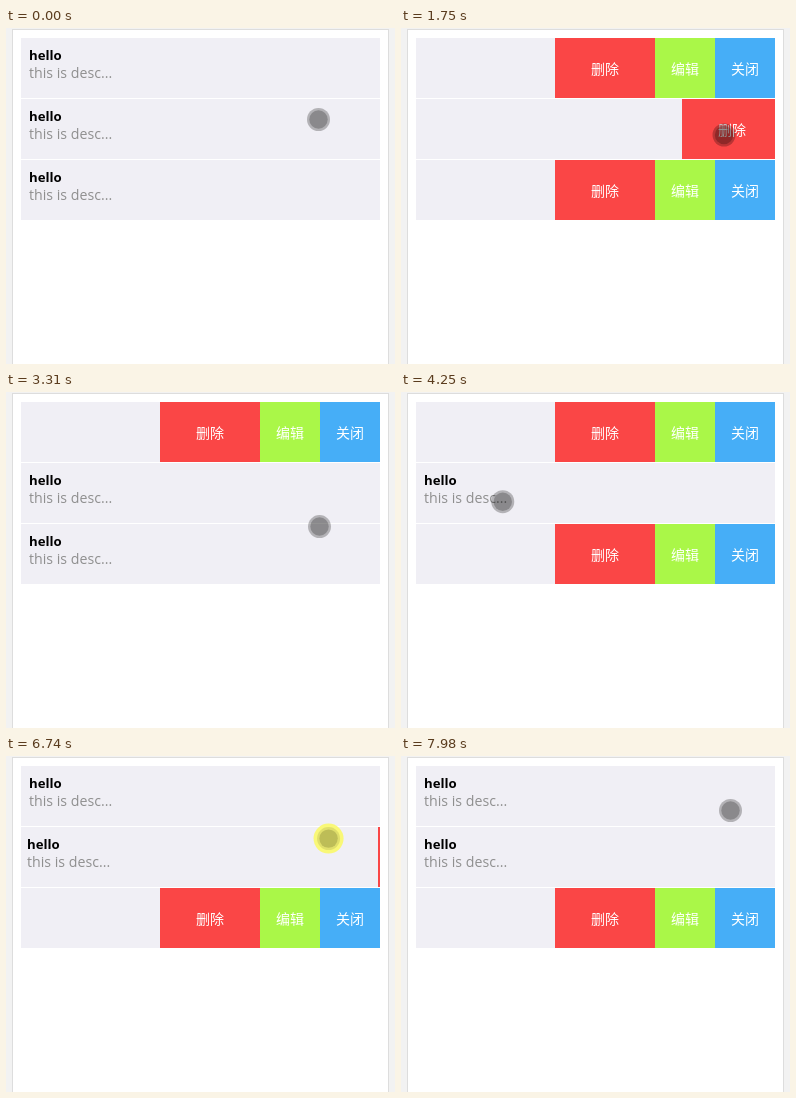
An HTML page with a canvas that plays this animation: 389x336 px, repeating every 8000 ms.

```html
<!DOCTYPE html>
<html lang="zh">
<head>
<meta charset="utf-8">
<title>Swipe list</title>
<style>
html, body { margin: 0; width: 100%; height: 100%; overflow: hidden; background: #f2f2f2; }
canvas { display: block; width: 389px; height: 336px; }
</style>
</head>
<body>
<canvas id="stage"></canvas>
<script>
const W = 389, H = 336, LOOP = 8000, TICK = 77.5;
const LEFT = 15, RIGHT = 374, TOP = 10, ROW_H = 60, PITCH = 61, ROWS = 3;
const OPEN = 220, SETTLE = 250;
const LATIN = '"Open Sans", "Noto Sans", sans-serif';
const HAN = '500 14px "Noto Sans CJK SC", "Noto Sans CJK", "Noto Sans CJK JP", sans-serif';

const canvas = document.getElementById('stage');
const ctx = canvas.getContext('2d');
const ratio = window.devicePixelRatio || 1;
canvas.width = Math.round(W * ratio);
canvas.height = Math.round(H * ratio);

const actions = [
  { label: '删除', width: 100, color: '#fa4646' },
  { label: '编辑', width: 60, color: '#aaf748' },
  { label: '关闭', width: 60, color: '#46aef7' }
];

// Spells of activity; the picture rests between them.
const spells = [[100, 2280], [2530, 3060], [3310, 4960], [5110, 5660], [5810, 7280], [7520, 7980]];

// Each swipe drags a row from one point to another; row -1 only hovers.
const swipe = (row, press, release, from, to) => ({ row, press, release, from, to });
const swipes = [
  swipe(1, 180, 330, [312.5, 91.5], [215, 95]),
  swipe(2, 540, 697, [330, 160], [230, 86]),
  swipe(0, 1000, 1180, [300, 54], [190, 46]),
  swipe(1, 1440, 1727, [196, 100], [323, 107]),
  swipe(2, 2530, 2700, [170, 185], [338, 172]),
  swipe(2, 3320, 3700, [313.5, 134.5], [130, 150]),
  swipe(-1, 4180, 4700, [84, 117], [238, 54]),
  swipe(0, 5110, 5178, [110, 54], [194, 64]),
  swipe(0, 5810, 5980, [318, 48], [205, 46]),
  swipe(0, 6230, 6390, [205, 48], [315, 56]),
  swipe(1, 6735, 6960, [325, 82.5], [215, 88]),
  swipe(1, 7560, 7740, [190, 95], [300, 85]),
  swipe(-1, 7980, LOOP, [329.5, 54.5], [329.5, 54.5])
];

const clamp = (v, min, max) => Math.min(max, Math.max(min, v));
const progress = (t, from, to) => clamp((t - from) / (to - from), 0, 1);
const mix = (a, b, u) => a + (b - a) * u;
const smooth = u => u * u * (3 - 2 * u);
const easeOut = u => 1 - (1 - u) ** 2;

// Holds each picture for one tick.
function stepTime(t) {
  const spell = spells.filter(([start]) => t >= start).pop();
  if (!spell) return 0;
  const [start, end] = spell;
  return start + Math.floor((Math.min(t, end) - start + 9) / TICK) * TICK;
}

function pointerAt(t) {
  const i = Math.max(0, swipes.findLastIndex(s => t >= s.press));
  const s = swipes[i], next = swipes[i + 1];
  const travel = t > s.release && next;
  const [a, b] = travel ? [s.to, next.from] : [s.from, s.to];
  const u = travel ? smooth(progress(t, s.release, next.press)) : progress(t, s.press, s.release);
  return [mix(a[0], b[0], u), mix(a[1], b[1], u)];
}

// The row follows the pointer, then settles open or shut.
function pullAt(row, t) {
  let pull = 0;
  for (const s of swipes) {
    if (s.row !== row || t < s.press) continue;
    const dx = (s.from[0] - s.to[0]) * progress(t, s.press, s.release);
    const goal = s.from[0] > s.to[0] ? OPEN : 0;
    pull = mix(clamp(pull + dx, 0, OPEN), goal, easeOut(progress(t, s.release, s.release + SETTLE)));
  }
  return Math.round(pull);
}

function box(x, y, w, h, color) {
  ctx.fillStyle = color;
  ctx.fillRect(x, y, w, h);
}

function disc([x, y], r, color) {
  ctx.fillStyle = color;
  ctx.beginPath();
  ctx.arc(x, y, r, 0, Math.PI * 2);
  ctx.fill();
}

function write(text, x, y, font, color, align) {
  ctx.font = font;
  ctx.fillStyle = color;
  ctx.textAlign = align;
  ctx.fillText(text, x, y);
}

function eachRow(paint) {
  for (let i = 0; i < ROWS; i++) {
    const y = TOP + i * PITCH;
    ctx.save();
    ctx.beginPath();
    ctx.rect(LEFT, y, RIGHT - LEFT, ROW_H);
    ctx.clip();
    paint(i, y);
    ctx.restore();
  }
}

function drawContent(y, pull) {
  box(LEFT, y, RIGHT - LEFT, ROW_H, '#f0eff5');
  write('hello', 23 - pull, y + 22, 'bold 13.2px ' + LATIN, '#000', 'left');
  write('this is desc...', 23 - pull, y + 40, '14.2px ' + LATIN, '#8f8f8f', 'left');
}

function drawActions(y, pull) {
  let x = RIGHT - pull;
  for (const { label, width, color } of actions) {
    box(x, y, width, ROW_H, color);
    write(label, x + width / 2, y + 36, HAN, '#fff', 'center');
    x += width;
  }
}

function drawPointer(spot, pressed) {
  if (pressed) disc(spot, 15, 'rgba(250, 248, 105, 0.9)');
  ctx.globalCompositeOperation = 'multiply';
  disc(spot, 11.5, pressed ? '#e6e6e6' : '#bebebe');
  disc(spot, 9.2, pressed ? '#d8d8d0' : '#c4c4c4');
  ctx.globalCompositeOperation = 'source-over';
}

function draw(t) {
  const spot = pointerAt(t);
  const drags = swipes.filter(s => s.row >= 0);
  const pressed = drags.some(s => t >= s.press && t < s.release);
  const ripple = drags.some(s => t > s.release + 60 && t < s.release + 120);
  ctx.setTransform(ratio, 0, 0, ratio, 0, 0);
  box(0, 0, W, H, '#f2f2f2');
  box(6, 1, 377, H, '#dddddd');
  box(7, 2, 375, H, '#ffffff');
  eachRow((i, y) => drawContent(y, pullAt(i, t)));
  // A letting-go ripple glows beneath the buttons.
  if (ripple) disc(spot, 10, '#86d99a');
  eachRow((i, y) => drawActions(y, pullAt(i, t)));
  if (!ripple) drawPointer(spot, pressed);
}

function tick() {
  draw(stepTime(performance.now() % LOOP));
  requestAnimationFrame(tick);
}
tick();
</script>
</body>
</html>
```
